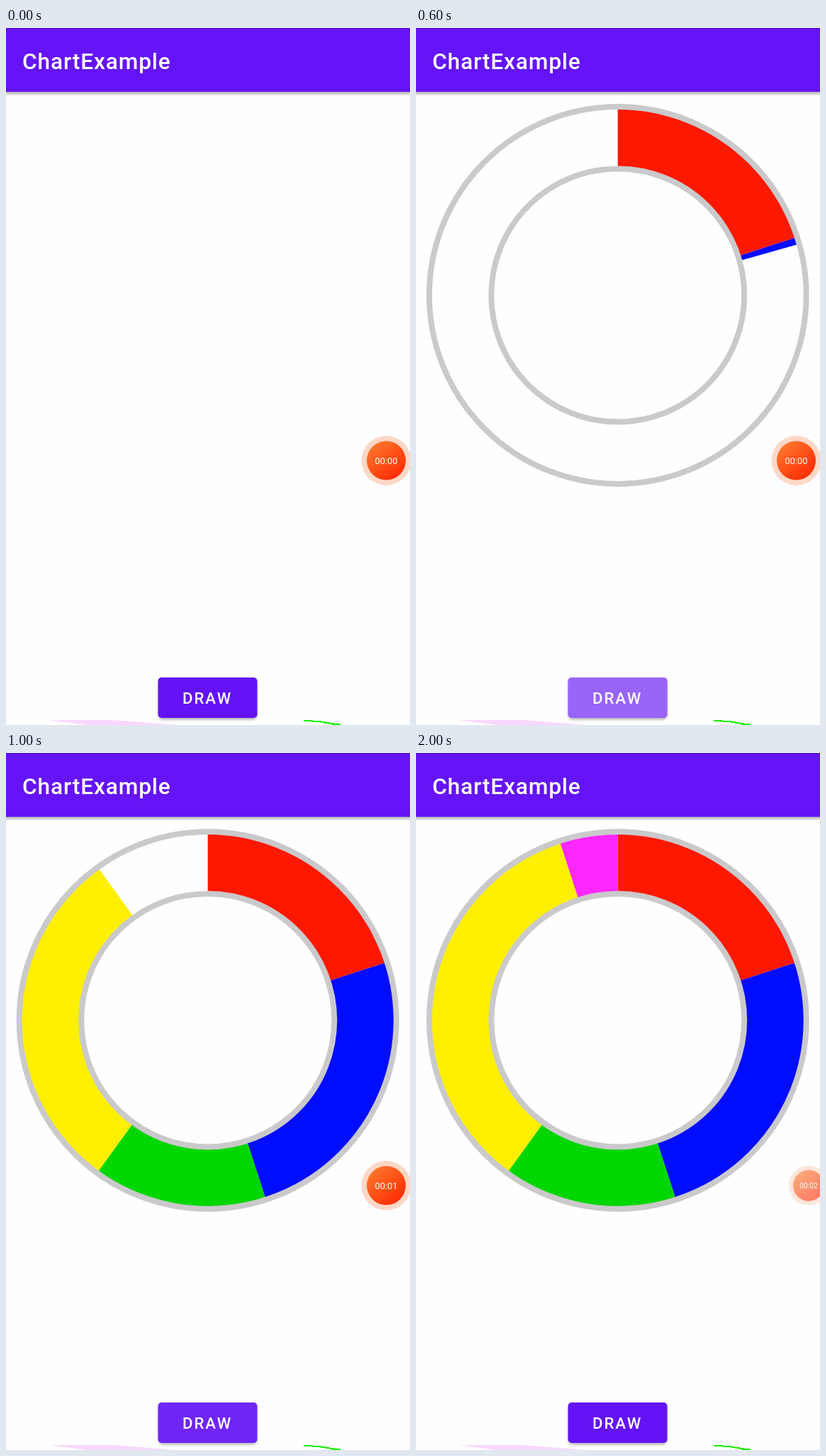
These frames come from a looping animation (570 by 983 pixels, 2.4 s). An HTML page:

```html
<!DOCTYPE html>
<html lang="en">
<head>
<meta charset="utf-8">
<title>ChartExample</title>
<style>
  html, body { margin: 0; width: 100%; height: 100%; overflow: hidden; background: #fefdff; }
  svg { display: block; width: 100%; height: 100%; }
  text { font-family: Roboto, sans-serif; fill: #fff; }
  .title { font-size: 31.7px; font-weight: 500; letter-spacing: .85px; }
  .label { font-size: 22.2px; font-weight: 500; letter-spacing: 1.98px; }
  .timer { font-size: 12.8px; text-anchor: middle; }
  .ring { fill: none; stroke: #cac9cb; stroke-width: 8; }
</style>
</head>
<body>
<svg viewBox="0 0 570 983">
  <defs>
    <linearGradient id="barShadow" x2="0" y2="1">
      <stop stop-color="#777" stop-opacity=".6"/>
      <stop offset="1" stop-color="#777" stop-opacity="0"/>
    </linearGradient>
    <linearGradient id="ember" x1=".15" y1=".1" x2=".8" y2=".9">
      <stop stop-color="#ff762b"/>
      <stop offset="1" stop-color="#ff2d05"/>
    </linearGradient>
    <filter id="blur" x="-10%" y="-30%" width="120%" height="160%">
      <feGaussianBlur stdDeviation="2"/>
    </filter>
  </defs>

  <rect width="570" height="983" fill="#fefdff"/>
  <rect y="90" width="570" height="6" fill="url(#barShadow)"/>
  <rect width="570" height="90" fill="#6414f6"/>
  <rect width="570" height="1" fill="#430db0"/>
  <text class="title" x="23" y="58">ChartExample</text>

  <g id="chart" transform="translate(284.7 377)">
    <g id="slices" transform="rotate(-90)" fill="none" stroke-width="82"></g>
    <circle class="ring" r="266"/>
    <circle class="ring" r="178.5"/>
  </g>

  <path d="M60 976H150L240 983H115Z" fill="#fad7ff"/>
  <path d="M420 977h13M432 978h13M444 979h7M450 980h7M456 981h7M460 982h12" stroke="#1cf000" stroke-width="2"/>

  <rect id="shadow" x="215.5" y="919" width="138" height="56" rx="5" filter="url(#blur)"/>
  <rect x="214.5" y="916" width="140" height="57" rx="5" fill="#6413f6"/>
  <rect id="ripple" x="214.5" y="916" width="140" height="57" rx="5" fill="#fff"/>
  <text class="label" x="249" y="953">DRAW</text>

  <g id="recorder">
    <g id="badge">
      <circle r="35" fill="#fdd8c7"/>
      <circle r="27.5" fill="url(#ember)"/>
    </g>
    <text class="timer" id="timer" y="4.8">00:00</text>
  </g>
</svg>
<script>
const LOOP = 2400, STEP = 100;
const $ = id => document.getElementById(id);

// Each track is a list of [start ms, value]; values hold until the next start.
const sweepTrack = [[0, 0], [600, 74.2], [700, 162], [800, 246.5], [1000, 324.3], [1100, 350], [1200, 358], [1300, 360]];
const rippleTrack = [[0, 0], [600, .34], [700, .28], [800, .22], [1000, .08], [1100, .04], [1200, 0]];
const dockTrack = [[0, 0], [1800, .33], [1900, .75], [2000, 1]];
const timerTrack = [[0, "00:00"], [700, "00:01"], [1700, "00:02"]];
const valueAt = (track, t) => track.findLast(([start]) => start <= t)[1];

let angle = 0;
const slices = [[72, "#ff1800"], [90, "#000cff"], [54, "#00d600"], [126, "#fff000"], [18, "#ff27ff"]]
  .map(([size, color]) => {
    const arc = document.createElementNS($("slices").namespaceURI, "circle");
    arc.setAttribute("r", 222.5);
    arc.setAttribute("pathLength", 360);
    arc.setAttribute("stroke", color);
    arc.setAttribute("stroke-dashoffset", -angle);
    $("slices").append(arc);
    const slice = { arc, size, start: angle };
    angle += size;
    return slice;
  });

function draw(t) {
  const sweep = valueAt(sweepTrack, t);
  $("chart").setAttribute("visibility", t < 500 ? "hidden" : "visible");
  for (const { arc, size, start } of slices) {
    const shown = Math.max(0, Math.min(size, sweep - start));
    arc.setAttribute("stroke-dasharray", `${shown} 360`);
    arc.style.display = shown ? "" : "none";
  }

  $("ripple").setAttribute("opacity", valueAt(rippleTrack, t));
  const pressed = t >= 500 && t < 600;
  $("shadow").setAttribute("opacity", pressed ? .5 : .35);
  $("shadow").setAttribute("y", pressed ? 921 : 919);

  const dock = valueAt(dockTrack, t);
  $("recorder").setAttribute("transform", `translate(${536.5 + 17.5 * dock} 610) scale(${1 - .2 * dock})`);
  $("badge").setAttribute("opacity", 1 - .38 * dock);
  $("timer").textContent = valueAt(timerTrack, t);
}

const origin = performance.now();
function tick() {
  const t = (performance.now() - origin) % LOOP;
  draw(Math.floor(t / STEP) * STEP);
  requestAnimationFrame(tick);
}
tick();
</script>
</body>
</html>
```
